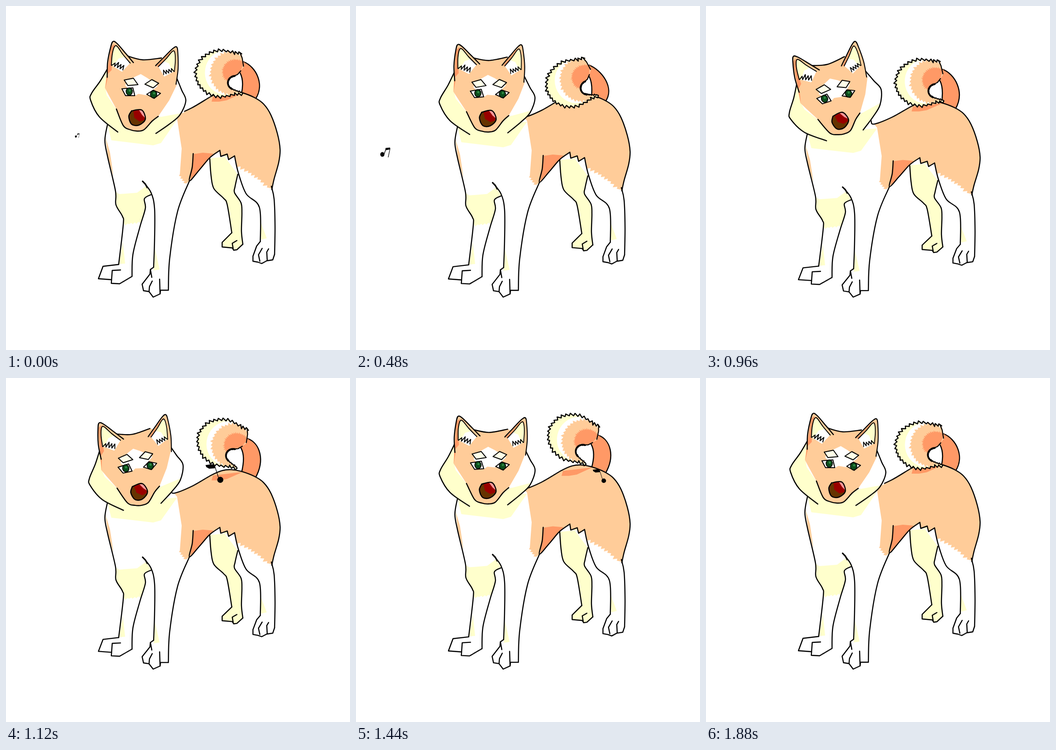
An HTML page that plays this animation: 748 by 748 pixels, repeating every 1920 ms.

```html
<!DOCTYPE html>
<html lang="en">
<head>
<meta charset="utf-8">
<title>Dancing dog</title>
<style>
  html, body { margin: 0; width: 100%; height: 100%; overflow: hidden; background: #fff; }
  svg { display: block; width: 100vw; height: 100vh; }
  path { stroke-linecap: round; stroke-linejoin: round; }
</style>
</head>
<body>
<svg id="stage" viewBox="0 0 748 748">
  <g id="stem"></g>
  <g id="body"></g>
  <g id="tail"></g>
  <g id="head"></g>
  <g id="noteA"></g>
  <g id="noteB"></g>
</svg>
<script>
const ORANGE = '#ffcc99', DARK = '#ff9966', CREAM = '#ffffcc', WHITE = '#fff', INK = '#000';
const LOOP = 1920, STEP = 40, GROUND = 634, RAD = Math.PI / 180;
const el = id => document.getElementById(id);

let seed = 7;
const random = () => (seed = seed * 16807 % 2147483647) / 2147483647;

const points = s => s.split(', ').map(p => p.split(' ').map(Number));
const poly = p => 'M' + p.map(q => q.map(v => v.toFixed(1)).join(' ')).join('L');

// Smooth curve through all points
function curve(p) {
  let d = `M${p[0].join(' ')}`;
  for (let i = 0; i < p.length - 1; i++) {
    const a = p[i - 1] || p[i], b = p[i], c = p[i + 1], e = p[i + 2] || c;
    d += `C${b[0] + (c[0] - a[0]) / 6} ${b[1] + (c[1] - a[1]) / 6} ` +
         `${c[0] - (e[0] - b[0]) / 6} ${c[1] - (e[1] - b[1]) / 6} ${c[0]} ${c[1]}`;
  }
  return d;
}

// Points on an ellipse between two angles in degrees
function arc(cx, cy, rx, ry, from, to) {
  return Array.from({ length: 25 }, (_, i) => {
    const a = (from + (to - from) * i / 24) * RAD;
    return [cx + rx * Math.cos(a), cy + ry * Math.sin(a)];
  });
}

// Uneven saw teeth along a line
function fur(p, step, depth) {
  const out = [p[0]];
  for (let i = 1; i < p.length; i++) {
    const [ax, ay] = p[i - 1], [bx, by] = p[i];
    const len = Math.hypot(bx - ax, by - ay), n = Math.max(1, Math.round(len / step));
    for (let j = 0; j < n; j++) {
      const u = (j + 0.75) / n, v = (j + 1) / n;
      const k = depth * (0.7 + 0.6 * random()) / len;
      out.push([ax + (bx - ax) * u - (by - ay) * k, ay + (by - ay) * u + (bx - ax) * k]);
      out.push([ax + (bx - ax) * v, ay + (by - ay) * v]);
    }
  }
  return out;
}

function add(parent, tag) {
  const node = document.createElementNS('http://www.w3.org/2000/svg', tag);
  parent.append(node);
  return node;
}
function path(parent, d, color = 'none', width = 0) {
  const node = add(parent, 'path');
  node.setAttribute('d', d);
  node.setAttribute('fill', color);
  if (width) { node.setAttribute('stroke', INK); node.setAttribute('stroke-width', width); }
  return node;
}
const fill = (g, p, color, w = 0) => path(g, poly(typeof p === 'string' ? points(p) : p) + 'Z', color, w);
const line = (g, s, w = 2.4) => path(g, poly(points(s)), 'none', w);
const bend = (g, s, w = 2.4) => path(g, curve(points(s)), 'none', w);
const disc = (x, y, rx, ry = rx) =>
  `M${x - rx} ${y}a${rx} ${ry} 0 1 0 ${2 * rx} 0a${rx} ${ry} 0 1 0 ${-2 * rx} 0Z`;

function drawBody(g) {
  const back = '359 229, 365 237, 403 222, 447 196, 470 186, 490 184, 512 188, 540 199, 560 213, 576 237, 590 277, 596 312, 593 340, 583 376, 578 399';
  const belly = '399 380, 420 357, 443 330, 465 314';
  const tuft = '465 314, 467 327, 481 322, 484 334, 497 326';
  const farFront = '443 331, 446 370, 452 397, 473 418, 481 432, 491 493';
  const farPaw = '491 493, 470 514, 470 524, 492 526, 495 531, 502 530, 515 518';
  const farBack = '515 518, 512 490, 513 450, 511 428, 497 406, 498 393, 504 366';

  fill(g, [farFront, farPaw, farBack, tuft].flatMap(points), CREAM);
  const coat = [...points(back), ...fur(points('575 396, 548 372, 527 358, 502 344'), 10, -6),
    ...points(tuft).reverse(), ...points(belly).reverse(),
    ...fur(points('392 386, 378 366'), 6, -4), ...points('382 310, 372 245')];
  fill(g, coat, ORANGE);
  fill(g, '450 197, 515 189, 480 205, 463 208, 447 208', DARK);
  fill(g, '407 322, 428 319, 451 321, 430 347, 401 377', DARK);
  fill(g, '216 284, 226 318, 234 372, 222 330', ORANGE);
  fill(g, '220 256, 229 292, 320 303, 337 298, 372 247', CREAM);
  fill(g, [...points('239 404, 246 409, 285 406, 304 392, 316 408, 301 416, 303 440'),
    ...fur(points('296 468, 257 474'), 8, -3), [253, 457], [240, 438]], CREAM);
  fill(g, '254 512, 259 560, 246 561', CREAM);
  fill(g, '324 528, 334 573, 321 575', CREAM);
  fill(g, '552 465, 567 505, 555 508', CREAM);

  for (const s of [back, farFront, farBack]) bend(g, s);
  for (const s of [tuft, farPaw]) line(g, s);
  line(g, '502 510, 492 516, 494 528');
  // Front legs
  bend(g, '221 256, 215 292, 221 328, 238 402, 239 432, 253 457, 255 475, 245 562');
  line(g, '245 562, 211 566, 201 593, 228 595');
  line(g, '249 574, 231 575, 229 603, 247 604, 274 588');
  bend(g, '274 588, 276 540, 291 481, 303 440, 301 419, 316 410');
  bend(g, '297 381, 315 405, 323 440, 323 510, 321 568');
  line(g, '297 381, 303 387, 307 395', 3);
  line(g, '321 568, 314 573, 317 590');
  line(g, '314 573, 313 583, 296 605, 299 619, 311 621, 320 633, 335 626, 336 618, 353 618');
  line(g, '318 598, 312 610, 311 621');
  line(g, '334 594, 335 626');
  bend(g, '353 618, 356 548, 373 447, 399 380');
  bend(g, '407 321, 405 350, ' + belly);
  // Near hind leg
  bend(g, '497 326, 505 362, 522 408, 551 438, 553 512');
  line(g, '553 512, 545 522, 537 544, 537 555, 548 557, 556 560, 567 554, 580 552, 584 540');
  bend(g, '584 540, 585 480, 583 420, 577 392');
  line(g, '557 527, 549 541, 552 555');
  line(g, '571 528, 567 535, 568 553');
}

function drawTail(g) {
  const top = [513, 104], tip = [515, 190], seam = [518, 131];
  const outer = fur([top, ...arc(470, 147, 55, 48, -60, -300), tip], 9, 5);
  const inner = [...fur([tip, ...arc(499, 167, 17, 16, 115, 270)], 5, 2), [504, 149]];
  const ring = (edge, color) => fill(g, [...edge, ...inner, seam], color);
  ring(outer, CREAM);
  ring([top, ...arc(478, 145, 45, 48, -60, -300), tip], WHITE);
  ring([top, ...fur(arc(488, 146, 41, 44, -60, -300), 8, 5), tip], ORANGE);
  fill(g, [...fur(arc(500, 143, 27, 25, -45, -235), 8, 4), [482, 164], [487, 153], [504, 149], [511, 141], [519, 120]], DARK);
  path(g, poly(outer), 'none', 2.4);
  path(g, poly([...inner, [511, 141]]), 'none', 2.2);
  line(g, '509 101, 514 113, 517 131', 2.2);
}

// Ear with its tip at the origin
function drawEar(g, shade) {
  const rim = '-13 78, -12 45, -5 11, 0 0, 9 5, 28 27, 44 46';
  const lining = '-4 52, -2 28, 3 11, 9 11, 21 28, 37 47';
  fill(g, rim, ORANGE);
  fill(g, shade, DARK);
  fill(g, lining + ', 20 62', CREAM);
  fill(g, '0 54, 12 37, 26 34, 37 47, 19 66', WHITE);
  bend(g, rim);
  bend(g, lining, 2);
  path(g, poly(fur(points('-3 52, 21 62'), 6, -9)), 'none', 2);
}

function drawHead(g) {
  const cheekL = '222 134, 205 163, 186 190, 184 205, 203 241, 243 274';
  const cheekR = '326 277, 355 257, 378 237, 391 206, 382 183, 371 156';
  const brow = '262 108, 297 117, 338 113';
  const muzzle = '240 224, 255 260, 270 269, 285 272, 300 269, 318 250, 331 240';
  path(g, curve(points(cheekL)) + 'L' + curve(points(cheekR)).slice(1) + 'Z', CREAM);
  fill(g, '371 160, 382 183, 391 206, 387 232, 326 243', WHITE);
  fill(g, '216 176, 219 194, 241 226, 246 190', WHITE);
  fill(g, [brow, '372 130, 371 172, 355 205'].flatMap(points).concat(points(muzzle).reverse(),
    points('224 195, 215 178, 222 135')), ORANGE);
  fill(g, '221 130, 244 138, 222 153, 216 178', DARK);
  fill(g, '259 172, 276 156, 293 148, 308 157, 330 174, 305 194, 288 191, 279 196', WHITE);
  for (const s of [cheekL, cheekR, brow]) bend(g, s);

  const left = add(g, 'g'), right = add(g, 'g'), mirrored = add(right, 'g');
  left.setAttribute('transform', 'translate(233 77)');
  mirrored.setAttribute('transform', 'translate(371 89) rotate(9) scale(-.88 1.03)');
  drawEar(left, '-13 72, -5 11, 3 6, -3 40, -3 62');
  drawEar(mirrored, '42 47, 14 13, 5 9, 14 16, 37 47');

  fill(g, '257 161, 277 157, 287 171, 265 173', '#ffffe8', 2);
  fill(g, '302 170, 317 160, 332 168, 320 178', '#ffffe8', 2);
  fill(g, '252 180, 276 178, 280 195, 260 195', WHITE, 2);
  fill(g, '306 192, 320 183, 336 190, 322 201', WHITE, 2);
  for (const [x, y] of [[268, 186], [321, 192]]) {
    path(g, disc(x, y, 7, 8), '#0a4d1c', 1.6);
    path(g, disc(x + 1, y - 2, 2.4), '#2f8a45');
  }
  bend(g, muzzle);
  const nose = curve(points('273 228, 295 226, 303 246, 289 259, 273 257, 267 240, 273 228'));
  path(g, nose, '#663300');
  fill(g, '277 228, 289 225, 301 231, 301 248, 290 251, 279 243', '#990000');
  fill(g, '289 226, 298 228, 303 236, 302 243, 296 237', '#ff9999');
  path(g, nose, 'none', 2.4);
  return right;
}

function drawNotes(a, b) {
  path(a, disc(-7, 4, 4.6, 5.2), INK);
  line(a, '-3 3, 1 -8', 1.4);
  fill(a, '0 -10, 10 -11, 10 -7, 0 -5', INK);
  line(a, '10 -9, 6 10', 1.2);
  path(b, disc(15, 18, 7.4), INK);
  line(b, '11 14, 2 -14', 1.4);
  fill(b, '-21 -18, -4 -20, 2 -16, 2 -10, -12 -9, -19 -13', INK);
}

drawBody(el('body'));
drawTail(el('tail'));
const ear = drawHead(el('head'));
drawNotes(el('noteA'), el('noteB'));
const stemFill = path(el('stem'), '', DARK);
const stemLine = path(el('stem'), '', 'none', 2.4);

const place = (node, transform) => node.setAttribute('transform', transform);

// Curls in, swings out past rest, then settles
function tailAngle(t) {
  if (t < 700) return -39.5 * (t / 700) ** 2;
  if (t < 1280) return -39.5 + 79.5 * (t - 700) / 580;
  return 40 * Math.max(0, (1880 - t) / 600) ** 2;
}

function fly(note, p, route) {
  const on = p >= 0 && p < 1;
  note.setAttribute('visibility', on ? 'visible' : 'hidden');
  if (!on) return;
  const [x, y, size] = route(p);
  place(note, `translate(${x} ${y}) scale(${size})`);
}
const routeA = p => {
  const arch = Math.sin(Math.PI * p);
  return [155 - 140 * p, 282 + 52 * arch - 15 * p, 0.45 + 0.6 * arch];
};
const routeB = p => [424 + 200 * p, 203 + 16 * p, Math.sin(Math.PI * Math.sqrt(p)) ** 1.5];

function pose(t) {
  const u = t <= 960 ? t / 960 : (1880 - t) / 920;
  const sink = u * u, s = 1 - 0.05 * sink;
  const drop = y => GROUND - (GROUND - y) * s;
  place(el('body'), `translate(0 ${drop(0)}) scale(1 ${s})`);
  place(el('head'), `rotate(${-18.5 * sink} 311 225)`);
  const flick = Math.max(0, 1 - Math.abs(t - 1280) / 320);
  place(ear, `translate(${6 * flick} ${4 * flick}) rotate(${6 * flick} 370 171)`);

  const deg = tailAngle(t), cos = Math.cos(deg * RAD), sin = Math.sin(deg * RAD);
  const x = 513 + 0.08 * deg, y = 146.5 + 16 * sink - 0.17 * deg;
  place(el('tail'), `translate(${x} ${y}) rotate(${deg}) translate(-513.5 -146.5)`);
  const turn = (px, py) => [x + px * cos - py * sin, y + px * sin + py * cos];
  const [ox, oy] = turn(4, -25), [ix, iy] = turn(-4, -1);
  const bulge = `${518 + 0.17 * deg} ${y + 16}`, base = `512 ${drop(191)}`;
  const outer = `M${ox} ${oy}C${ox + 26} ${oy + 10} 564 ${y + 24} 542 ${drop(203)}`;
  stemFill.setAttribute('d', `${outer}L${base}Q${bulge} ${ix} ${iy}Z`);
  stemLine.setAttribute('d', `${outer}M${ix} ${iy}Q${bulge} ${base}`);

  fly(el('noteA'), t / 740, routeA);
  fly(el('noteB'), (t - 1000) / 840, routeB);
}

const start = performance.now();
function tick() {
  const t = (performance.now() - start) % LOOP;
  pose(Math.floor(t / STEP) * STEP);
  requestAnimationFrame(tick);
}
tick();
</script>
</body>
</html>
```
